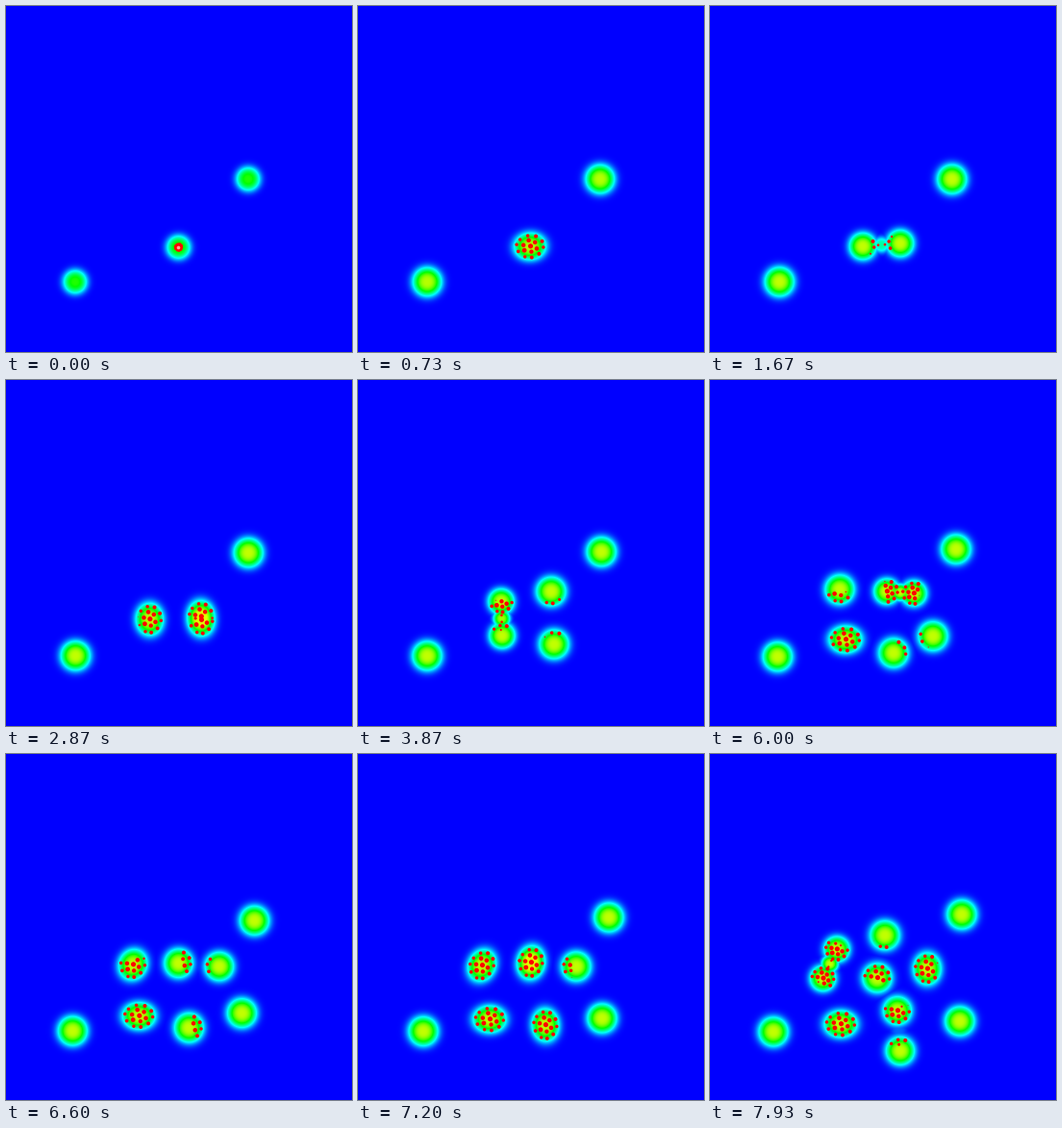
A matplotlib script for the animation above (8000 ms loop, 360 px wide and 360 px high).

```python
import math
import numpy as np
import matplotlib.pyplot as plt
from matplotlib.animation import FuncAnimation

SIZE, FRAMES, LOOP = 360, 120, 8.0
YOUNG, PEAK = 0.53, 0.69   # field value in the middle of a cell: at first, grown
POWER = 6                  # higher = harder union between cells
REACH = 36                 # half width of the window a cell is drawn in

rng = np.random.default_rng(4)


def clamp(x):
    return min(max(x, 0.0), 1.0)


def ease(x):
    x = clamp(x)
    return x * x * (3 - 2 * x)


def unit(v):
    return v / np.hypot(*v)


def hermite(keys, t):
    """Smooth path through rows of (time, x, y)."""
    ts, vals = keys[:, 0], keys[:, 1:]
    t = min(max(t, ts[0]), ts[-1])
    i = min(int(np.searchsorted(ts, t, side="right")) - 1, len(ts) - 2)
    slope = np.gradient(vals, ts, axis=0)
    h = ts[i + 1] - ts[i]
    s = (t - ts[i]) / h
    return ((1 + 2 * s) * (1 - s) ** 2 * vals[i] + s * (1 - s) ** 2 * h * slope[i]
            + s * s * (3 - 2 * s) * vals[i + 1] + s * s * (s - 1) * h * slope[i + 1])


class Cell:
    """Follows a path, loses its spots after a split and refills until `full`."""

    def __init__(self, *path, axis=(1, 0), full=None, low=0.25):
        self.path = np.array(path, float)
        self.axis, self.full, self.low = np.array(axis, float), full, low
        self.born, self.end = 0, LOOP + 1
        self.sister = None

    def alive(self, t):
        return self.born <= t < self.end

    def pos(self, t):
        return hermite(self.path, t)

    def gap(self, t):
        return float(np.hypot(*(self.sister.pos(t) - self.pos(t))))

    def phase(self, t):
        return clamp((t - self.born) / (self.full - self.born)) if self.full else 0

    def cover(self, t):
        if self.sister is None:
            return 1 if self.full else 0
        if self.full is None:
            return clamp(1 - 1.1 * (t - self.born))
        dip = math.sin(math.pi * min(1, 1.08 * self.phase(t)))
        return 1 - (1 - self.low) * dip * clamp((self.gap(t) - 20) / 15)

    def shape(self, t):
        """Matrix from the unit disc to the cell's ellipse."""
        axis, stretch = self.axis, ease((self.phase(t) - 0.6) / 0.4)
        if self.sister is None:
            r = 12.5 + 2.5 * ease(t / 0.8)
        else:
            gap = self.gap(t)
            r = 15 - 1.8 * (ease(gap / 25) - ease((gap - 35) / 10))
            if gap < 25:
                axis, stretch = self.dir, 1 - ease(gap / 25)
        along = np.outer(axis, axis)
        return (r - stretch) * np.eye(2) + 3 * stretch * along


cells, pairs = [], []


def split(parent, t, a, b):
    """Parent divides at time t into the sisters a and b."""
    parent.end = t
    parent.full = parent.full or t
    start = [t, *parent.pos(t)]
    a.dir = unit(b.path[0, 1:] - a.path[0, 1:])
    b.dir = -a.dir
    parent.axis = a.dir
    for cell, other in ((a, b), (b, a)):
        cell.path = np.vstack([start, cell.path])
        cell.born, cell.sister = t, other
    cells.extend((a, b))
    pairs.append((a, b))
    return a, b


right = Cell((0, 252, 180), (2.5, 252, 180), (5.2, 255, 177), (6, 256, 176),
             (7.2, 261, 170), (7.87, 262, 167))
left = Cell((0, 72, 287), (3.87, 72, 287), (7.2, 68, 288.5), (7.87, 66, 289))
seed = Cell((0, 179.5, 251), (0.75, 179, 250))
cells += [right, left, seed]

west, east = split(
    seed, 0.75,
    Cell((1.67, 159, 250), (2.4, 151, 249), (3.1, 149, 249)),
    Cell((1.67, 198, 247), (2.3, 203, 247.5), (2.8, 203, 248)))
ne, se = split(
    east, 2.8,
    Cell((3.87, 201, 220), (5.2, 198, 223)),
    Cell((3.87, 204, 275), (5.2, 207.5, 272)))
nw, sw = split(
    west, 3.1,
    Cell((3.87, 149, 230.5), (5.2, 138, 215), (6, 135, 218), (7.2, 129, 220)),
    Cell((3.87, 150, 266), (5.2, 148, 268), (6, 141, 270), (7.2, 137, 276),
         (7.87, 136, 281), full=5.3))
s1, s2 = split(
    se, 5.3,
    Cell((6, 191, 284), (7.2, 195, 282)),
    Cell((6, 232, 266.5), (7.2, 254, 275), (7.87, 260, 278)))
n1, n2 = split(
    ne, 5.4,
    Cell((6, 184, 220), (6.5, 180, 218), (7.2, 180, 217)),
    Cell((6, 212, 222), (7.2, 227, 221), (7.87, 226, 223.5), axis=(0, 1), full=8.2))
split(n1, 7.2, Cell((7.87, 182, 188.5)), Cell((7.87, 174, 233), full=9, low=0.65))
split(s1, 7.25, Cell((7.87, 195, 267), full=9, low=0.65), Cell((7.87, 198, 309)))
split(nw, 7.4, Cell((7.87, 132, 203), full=9, low=0.65),
      Cell((7.87, 117.5, 233.5), full=9, low=0.65))


def ring(count, radius, turn):
    a = turn + 2 * np.pi * np.arange(count) / count + rng.uniform(-0.08, 0.08, count)
    r = radius + rng.uniform(-0.04, 0.04, count)
    return np.column_stack([r * np.cos(a), r * np.sin(a)])


# spot layout inside a cell of radius one, smaller towards the rim
SPOTS = np.vstack([[[0.03, -0.02]], ring(6, 0.43, 0.3), ring(10, 0.83, 0.1)])
SPOT_R = 2.4 - 0.8 * np.hypot(*SPOTS.T) ** 2 + rng.uniform(-0.2, 0.2, len(SPOTS))


def stamp(field, pos, shape, amp):
    x0, y0 = (max(int(p) - REACH, 0) for p in pos)
    x1, y1 = (min(int(p) + REACH, SIZE) for p in pos)
    dx = np.arange(x0, x1)[None, :] + 0.5 - pos[0]
    dy = np.arange(y0, y1)[:, None] + 0.5 - pos[1]
    m = np.linalg.inv(shape)
    u = m[0, 0] * dx + m[0, 1] * dy
    v = m[1, 0] * dx + m[1, 1] * dy
    field[y0:y1, x0:x1] += (amp * np.exp(-(u * u + v * v) ** 1.5)) ** POWER


def cell_spots(cell, t):
    off = SPOTS @ cell.shape(t)
    if cell.sister is None:
        off *= 0.28 + 0.72 * ease(t / 0.6)
        show = np.full(len(SPOTS), cell.cover(t))
    else:
        # spots stay on the side facing the sister, short of the midline
        show = np.clip((SPOTS @ cell.dir - 1 + 2 * cell.cover(t)) / 0.15, 0, 1)
        if cell.sister.alive(t):
            show *= np.clip(cell.gap(t) / 2 + 1 - off @ cell.dir, 0, 1)
    return cell.pos(t) + off, SPOT_R * show


def rainbow(v):
    h = 4 * (1 - v)
    rgb = np.stack([2 - h, np.minimum(h, 4 - h), h - 2], axis=-1)
    return np.clip(rgb, 0, 1)


def scene(t):
    field = np.zeros((SIZE, SIZE))
    places, sizes = [], []
    amp = YOUNG + (PEAK - YOUNG) * ease(t / 0.8)
    for cell in cells:
        if cell.alive(t):
            stamp(field, cell.pos(t), cell.shape(t), amp)
            p, r = cell_spots(cell, t)
            places.append(p)
            sizes.append(r)
    for a, b in pairs:
        if not (a.alive(t) and b.alive(t)):
            continue
        gap = a.gap(t)
        mid = (a.pos(t) + b.pos(t)) / 2
        neck = clamp((43 - gap) / 8)
        if neck > 0:
            stamp(field, mid, 8.5 * np.eye(2), PEAK * neck)
        if 30 < gap < 41:
            places.append(np.array([mid - 3.5 * a.dir, mid + 3.5 * a.dir]))
            sizes.append(np.full(2, 1.3 * clamp((gap - 30) / 4)))
    value = np.minimum(field ** (1 / POWER), 0.72)
    return rainbow(value), np.vstack(places), np.concatenate(sizes)


fig = plt.figure(figsize=(3.6, 3.6), dpi=100)
ax = fig.add_axes([0, 0, 1, 1])
ax.axis("off")
picture = ax.imshow(np.zeros((SIZE, SIZE, 3)), extent=(0, SIZE, SIZE, 0),
                    interpolation="nearest")
spots = ax.scatter([], [], color="#ff0000", linewidths=0)
core = ax.scatter([178.8], [251], color="#ffa896", linewidths=0)
ax.set(xlim=(0, SIZE), ylim=(SIZE, 0))


def area(radius):
    return (2 * radius * 72 / 100) ** 2


def update(i):
    t = i * LOOP / FRAMES
    rgb, places, radii = scene(t)
    picture.set_data(rgb)
    seen = radii > 0.2
    spots.set_offsets(places[seen])
    spots.set_sizes(area(radii[seen]))
    core.set_sizes([area(1.8 * clamp(1 - t / 0.15))])
    return picture, spots, core


anim = FuncAnimation(fig, update, frames=FRAMES, interval=1000 * LOOP / FRAMES,
                     repeat=True, repeat_delay=0, blit=False)
plt.show()
```
